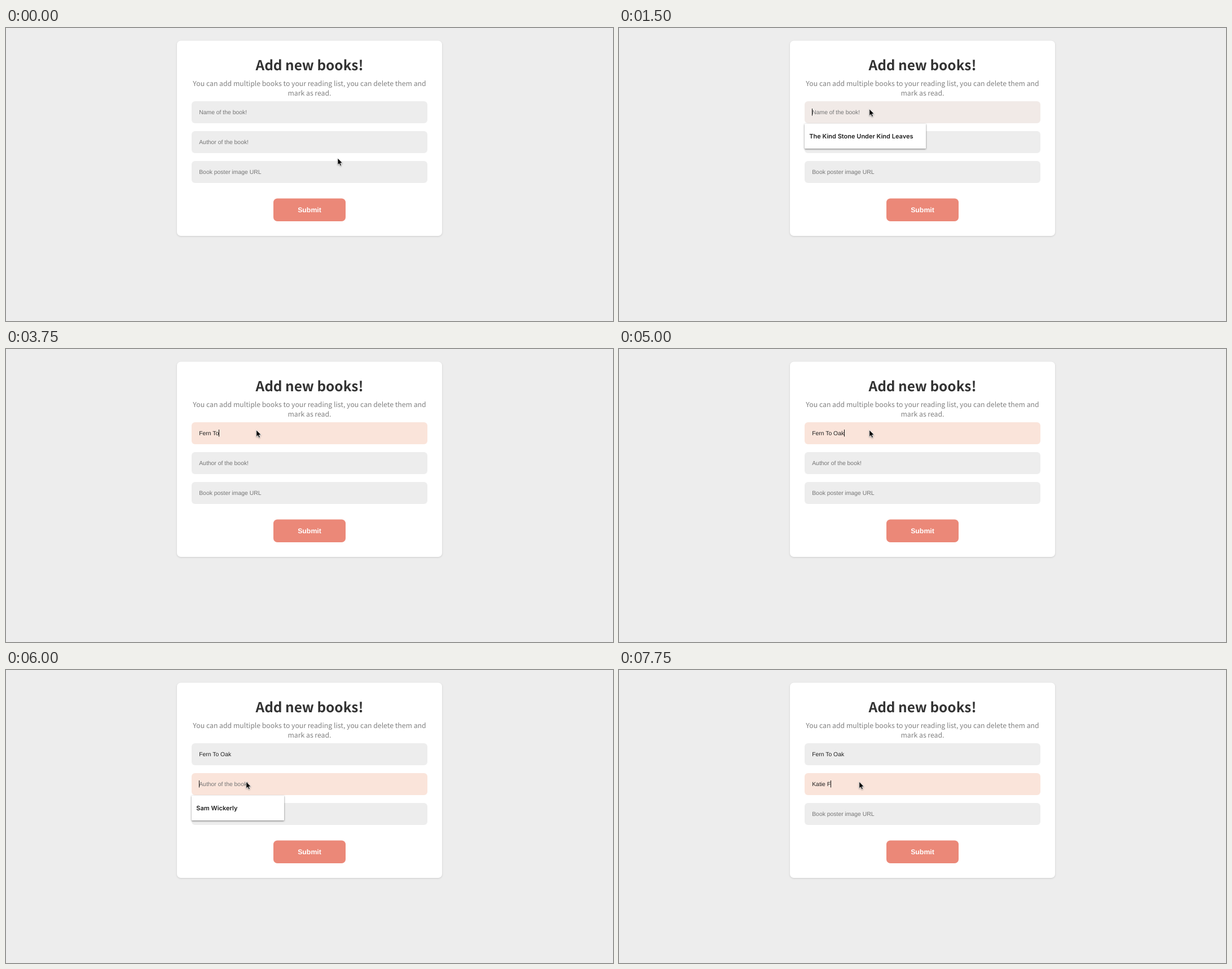
These frames come from a looping animation (1076x520 px, 8 s). An HTML page:

```html
<!DOCTYPE html>
<html lang="en">
<head>
<meta charset="utf-8">
<title>Add new books</title>
<style>
  html, body { margin: 0; width: 100%; height: 100%; overflow: hidden; background: #ededed; }
  svg { display: block; width: 1076px; height: 520px; }
  text { white-space: pre; text-rendering: geometricPrecision; }
  .head { font-family: "Noto Sans CJK JP", "Noto Sans CJK SC", "Noto Sans CJK", sans-serif; text-anchor: middle; }
  .title { font-size: 24.4px; font-weight: 700; fill: #333; }
  .sub { font-size: 12.25px; fill: #808080; }
  .value { font: 10.4px "Liberation Sans", Arial, sans-serif; }
  .submit { font: bold 12.3px "Liberation Sans", Arial, sans-serif; fill: #fff; text-anchor: middle; }
  .hint { font: 600 11px Inter, sans-serif; fill: #1f1f1f; }
  .card { filter: drop-shadow(0 1px 1.5px rgba(0, 0, 0, .14)); }
  .menu rect { fill: #fff; filter: drop-shadow(0 1px 1.5px rgba(0, 0, 0, .5)); }
  .pointer { filter: drop-shadow(0 1px 1px rgba(0, 0, 0, .35)); }
</style>
</head>
<body>
<svg viewBox="0 0 1076 520">
  <rect width="1076" height="520" fill="#ededed"/>
  <rect class="card" x="303" y="22.5" width="470" height="346.5" rx="7" fill="#fff"/>
  <text class="head title" x="538" y="74.5">Add new books!</text>
  <text class="head sub" x="538" y="102.5">You can add multiple books to your reading list, you can delete them and</text>
  <text class="head sub" x="538" y="119.5">mark as read.</text>
  <g id="fields"></g>
  <rect x="474" y="302.5" width="128" height="40.5" rx="7" fill="#eb8878"/>
  <text class="submit" x="538" y="327">Submit</text>
  <rect id="caret" width="1" height="12.5" fill="#111"/>
  <g id="menu" class="menu">
    <rect x="329" width="215" height="44" rx="1"/>
    <text class="hint" x="337.3"></text>
  </g>
  <path id="pointer" class="pointer" fill="#000" stroke="#fff" stroke-width=".8" stroke-linejoin="round"
    d="M0 0V12L2.7 9.6L4.6 13.8L6.6 12.9L4.8 8.8H8.5Z"/>
</svg>
<script>
const LOOP = 8000, STEP = 250, TEXT_X = 342.2;
const GREY = [237, 237, 237], PEACH = [250, 228, 218];
const byId = id => document.getElementById(id);
const caret = byId('caret'), menu = byId('menu'), pointer = byId('pointer');

function add(parent, tag, attrs) {
  const el = document.createElementNS('http://www.w3.org/2000/svg', tag);
  for (const k in attrs) el.setAttribute(k, attrs[k]);
  return parent.appendChild(el);
}

const fields = ['Name of the book!', 'Author of the book!', 'Book poster image URL'].map((label, i) => {
  const y = 130 + 53 * i;
  return {
    label, y,
    box: add(byId('fields'), 'rect', { x: 329, y, width: 418, height: 39, rx: 6 }),
    text: add(byId('fields'), 'text', { class: 'value', x: TEXT_X, y: y + 23.2, 'xml:space': 'preserve' })
  };
});

// Each entry is [time, characters typed so far].
const typing = [
  { value: 'Fern To Oak', keys: [[2250, 1], [2500, 2], [2750, 4], [3000, 5], [3500, 6], [3750, 7], [4000, 8], [4250, 9], [4500, 10], [5000, 11]] },
  { value: 'Katie F', keys: [[6250, 1], [6500, 2], [7000, 3], [7250, 4], [7500, 6], [7750, 7]] },
  { value: '', keys: [] }
];

const hints = [
  { from: 1500, to: 2250, y: 170, width: 215, label: 'The Kind Stone Under Kind Leaves' },
  { from: 5750, to: 6250, y: 223, width: 164, label: 'Sam Wickerly' }
];

const clamp = v => Math.max(0, Math.min(1, v));
const ramp = (t, from, to) => clamp((t - from) / (to - from));
const glide = p => 1 - (1 - p) ** 4;
const mix = (a, b, p) => a + (b - a) * p;

function typed({ value, keys }, t) {
  const last = keys.filter(k => k[0] <= t).pop();
  return value.slice(0, last ? last[1] : 0);
}

function draw(now) {
  const t = Math.floor(now % LOOP / STEP) * STEP;

  const blur = t < 5750 ? 0 : t < 6000 ? .03 : 1;
  const focusIn = t < 1500 ? 0 : t < 1750 ? .33 : t < 2000 ? .93 : 1;
  const glow = [focusIn * (1 - blur), blur, 0];

  fields.forEach((f, i) => {
    const value = typed(typing[i], t);
    f.text.textContent = value || f.label;
    f.text.setAttribute('fill', value ? '#222' : '#757575');
    f.box.setAttribute('fill', `rgb(${GREY.map((c, k) => Math.round(mix(c, PEACH[k], glow[i])))})`);
    f.end = value ? f.text.getComputedTextLength() : 0;
  });

  const active = fields[t < 5750 ? 0 : 1];
  caret.style.display = t < 1500 ? 'none' : '';
  caret.setAttribute('x', Math.round(TEXT_X + active.end));
  caret.setAttribute('y', active.y + 13);

  const hint = hints.find(h => t >= h.from && t < h.to);
  menu.style.display = hint ? '' : 'none';
  if (hint) {
    const [box, label] = menu.children;
    box.setAttribute('y', hint.y);
    box.setAttribute('width', hint.width);
    label.setAttribute('y', hint.y + 26.3);
    label.textContent = hint.label;
  }

  const up = glide(ramp(t, 0, 1000)), down = glide(ramp(t, 5000, 5750));
  const x = mix(mix(588, 443.8, up), 425.8, down);
  const y = mix(mix(231, 143.7, up), 198.2, down);
  pointer.setAttribute('transform', `translate(${x} ${y})`);
}

const start = performance.now();
function tick() {
  draw(performance.now() - start);
  requestAnimationFrame(tick);
}
tick();
</script>
</body>
</html>
```
